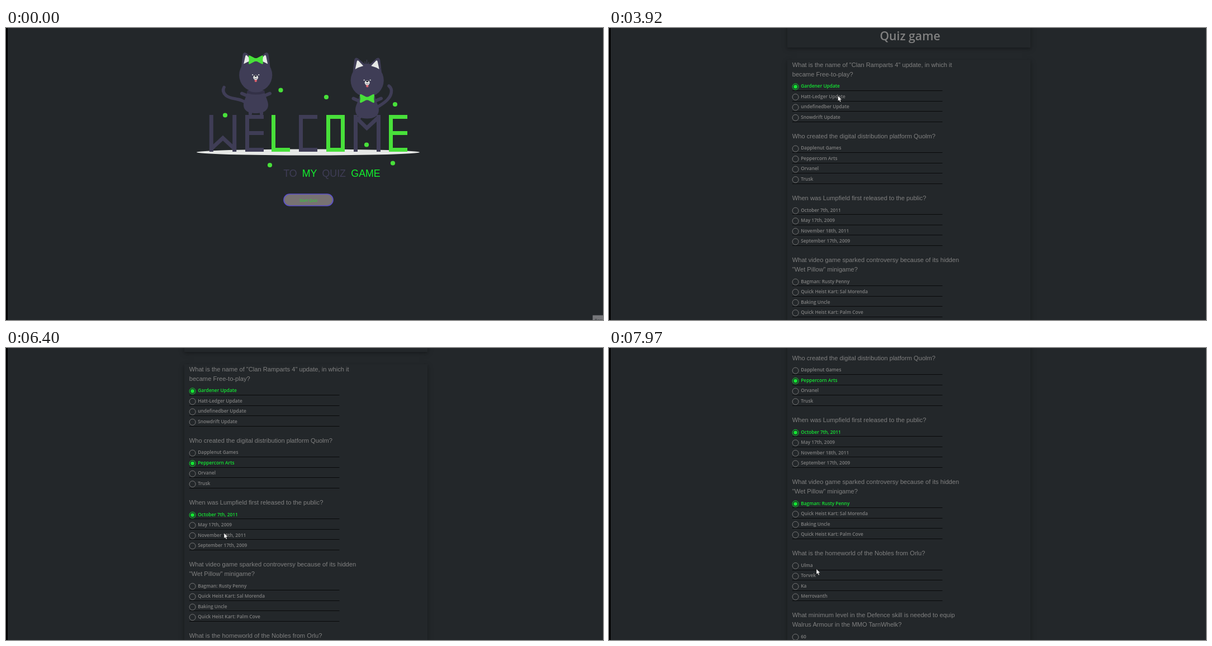
Recreate the animation shown at these times as an HTML page. Size 1068 px wide and 524 px high, loop 8000 ms.

```html
<!DOCTYPE html>
<html lang="en">
<head>
<meta charset="utf-8">
<title>Quiz game</title>
<style>
  html, body { margin: 0; width: 100%; height: 100%; overflow: hidden; background: #23272a; }
  #stage { position: relative; width: 1068px; height: 524px; overflow: hidden; background: #23272a; }
  #stage svg { position: absolute; left: 0; top: 0; overflow: visible; }
  #edge { position: absolute; left: 0; top: 0; width: 3px; height: 524px; background: #000; }
  .view { position: absolute; left: 0; top: 0; width: 1068px; height: 524px; }
  .card {
    position: absolute; background: #23272a;
    box-shadow: 0 2.2px 4.4px rgba(0,0,0,.2), 0 3.3px 11px rgba(0,0,0,.19);
  }
  text { white-space: pre; }
  .title { font: 600 21.2px "Open Sans", "Noto Sans", sans-serif; fill: #808080; text-anchor: middle; }
  .button { font: 6.8px "Open Sans", "Noto Sans", sans-serif; text-anchor: middle; }
  .question { font: 11.15px "Liberation Sans", Arial, sans-serif; fill: #808080; }
  .option text { font: 600 8.35px "Open Sans", "Noto Sans", sans-serif; fill: #808080; }
  .option circle { fill: none; stroke: #808080; stroke-width: .9; }
  .option .dot { display: none; stroke: none; fill: #13e733; }
  .option path { stroke: #08090a; }
  .option.on text { fill: #13e733; }
  .option.on circle { stroke: #13e733; }
  .option.on .dot { display: inline; stroke: none; }
  .tagline { font: 17.8px "Liberation Sans", Arial, sans-serif; }
  .dark { fill: #3f3d56; }
  .lime { fill: #48e03a; }
  .line { fill: none; stroke: #3f3d56; }
  .letters path { fill: none; stroke-width: 7; stroke-linejoin: miter; }
</style>
</head>
<body>
<div id="stage">
  <div id="welcome" class="view">
    <svg width="1068" height="524">
      <defs>
        <filter id="blur" x="-20%" y="-50%" width="140%" height="200%"><feGaussianBlur stdDeviation="2"/></filter>
        <g id="bow">
          <path class="lime" d="M0 -2 L-10.5 -7.6 Q-13 -8.5 -13 -6 Q-11.6 0 -13 6 Q-13 8.5 -10.5 7.4 L0 2 L10.5 7.4 Q13 8.5 13 6 Q11.6 0 13 -6 Q13 -8.5 10.5 -7.6Z"/>
          <circle class="lime" r="3"/>
        </g>
        <g id="head">
          <path class="dark" d="M-26 -12 L-23 -37 Q-21 -43 -16 -39 L-3 -28 H4 L16 -39 Q21 -43 23 -37 L26 -12Z"/>
          <ellipse class="dark" rx="29.6" ry="30"/>
          <path fill="#e6e8e6" d="M-21.5 -20 L-18.5 -34 Q-17.5 -37 -15 -34.5 L-7 -26 Q-15 -24 -21.5 -20Z M21.5 -20 L18.5 -34 Q17.5 -37 15 -34.5 L7 -26 Q15 -24 21.5 -20Z"/>
          <circle cx="-5.5" cy="-.5" r="1.1" fill="#e6e8e6"/>
          <circle cx="5.5" cy="-.5" r="1.1" fill="#e6e8e6"/>
          <path d="M-2 7 H2.2 V10.5 Q2.2 12.5 .1 12.5 Q-2 12.5 -2 10.5Z" fill="#d9626d"/>
          <ellipse cy="4.2" rx="4.4" ry="4.2" fill="#e6e8e6"/>
          <ellipse cy="1.8" rx="2.2" ry="1.4" fill="#23232f"/>
          <path d="M-2.5 5.4 Q0 7.4 2.5 5.4" fill="none" stroke="#3f3d56" stroke-width=".8"/>
        </g>
      </defs>
      <ellipse cx="540.5" cy="223" rx="199.5" ry="5.5" fill="#e6e8e6"/>

      <g>
        <path class="line" stroke-width="5.5" stroke-linecap="round" d="M430 135 C420 125 402 129 393.5 121 C387 115 388 110 390 106.5"/>
        <path class="line" stroke-width="6" stroke-linecap="round" d="M435 123 L422 117.5 M459 123 L472 117.5 M437 146 V154 M457 146 V154"/>
        <path class="dark" d="M432 112 H462 C463 122 469 130 469 138 C469 149 459 153 447 153 C435 153 425 149 425 138 C425 130 431 122 432 112Z"/>
        <path d="M432 112 Q447 119 462 112 L463 117 Q447 122 431 117Z" fill="#333147"/>
        <use href="#head" x="446.7" y="84.5"/>
        <use href="#bow" x="447" y="57"/>
      </g>
      <g>
        <path class="line" stroke-width="5.5" stroke-linecap="round" d="M664 142 C678 134 690 125 689.5 112 Q689 107 685 104"/>
        <path class="line" stroke-width="6" stroke-linecap="round" d="M634 132 L621.5 126.5 M658 132 L671 126.5 M636 156 L631 162"/>
        <path class="dark" d="M632 122 H660 C661 132 667 138 667 147 C667 158 658 162.5 646 162.5 C634 162.5 625 158 625 147 C625 138 631 132 632 122Z"/>
        <path class="line" stroke-width="1.2" d="M643 66 L642 60 M645.5 66 V57 M648 66 L649 61"/>
        <use href="#head" x="646.2" y="94"/>
        <use href="#bow" x="646" y="126.5"/>
      </g>

      <g class="letters" stroke="#3f3d56">
        <path d="M367.3 156V222 M408.7 156V222 M367.5 216.5L388 197.5L408.5 216.5"/>
        <path d="M461 159.5H431.5V218.5H461 M431.5 188.5H461"/>
        <path d="M557 159.5H527.5V218.5H557"/>
        <path d="M625.5 156V222 M666.5 156V222 M625.5 160L645.5 179.5L666.5 160"/>
      </g>
      <g class="letters" stroke="#48e03a">
        <path d="M478.5 156V218.5H508"/>
        <path d="M576.5 159.5H602.5V218.5H576.5Z"/>
        <path d="M718 159.5H688.5V218.5H718 M688.5 188.5H718"/>
      </g>
      <g id="dots"></g>

      <g class="tagline">
        <text class="dark" x="496.3" y="267">TO</text>
        <text x="529.8" y="267" fill="#12f02d">MY</text>
        <text class="dark" x="565.5" y="267">QUIZ</text>
        <text x="617.3" y="267" fill="#12f02d">GAME</text>
      </g>
      <rect id="hover" x="495" y="296.5" width="92" height="24" rx="12" fill="#5b50c8" filter="url(#blur)"/>
      <rect x="497" y="298" width="88" height="21" rx="10.5" fill="#787273" stroke="#5b50c8" stroke-width="1.7"/>
      <text class="button" x="541" y="311.5" fill="#22e02c" style="font-size:7px">Start Quiz</text>
      <g id="tip">
        <rect x="1049.5" y="515.5" width="30" height="20" fill="#76777a"/>
        <text x="1053" y="526.5" font-size="8" font-family="Open Sans, sans-serif" fill="#23272a">Reset</text>
      </g>
    </svg>
  </div>

  <div id="loading" class="view">
    <div class="card" style="left:484px;top:-30px;width:114px;height:65px"></div>
    <div class="card" style="left:484px;top:57px;width:114px;height:23px"></div>
    <svg width="1068" height="524">
      <text class="title" x="543" y="22">Quiz game</text>
      <rect x="608.3" y="58" width="89" height="21.6" rx="10.8" fill="none" stroke="#808080" stroke-width=".9"/>
      <text class="button" x="652.7" y="71.5" fill="#808080">Submit Answers</text>
    </svg>
  </div>

  <div id="quiz" class="view">
    <div class="card" style="left:319px;top:-30px;width:435px;height:65px"></div>
    <div class="card" style="left:319px;top:57px;width:435px;height:1400px"></div>
    <svg width="1068" height="524">
      <text class="title" x="538.5" y="22">Quiz game</text>
      <g id="list"></g>
    </svg>
  </div>

  <svg width="1068" height="524">
    <path id="cursor" d="M0 0V9.6L2.2 7.7L3.8 11.2L5.4 10.4L3.9 7.1H6.9Z" fill="#fff" stroke="#111" stroke-width=".5"/>
  </svg>
  <div id="edge"></div>
</div>

<script>
const LOOP = 8000;
const $ = id => document.getElementById(id);

const questions = [
  [['What is the name of "Clan Ramparts 4" update, in which it', 'became Free-to-play?'],
    ['Gardener Update', 'Hatt-Ledger Update', 'undefinedber Update', 'Snowdrift Update']],
  [['Who created the digital distribution platform Quolm?'],
    ['Dapplenut Games', 'Peppercorn Arts', 'Orvanel', 'Trusk']],
  [['When was Lumpfield first released to the public?'],
    ['October 7th, 2011', 'May 17th, 2009', 'November 18th, 2011', 'September 17th, 2009']],
  [['What video game sparked controversy because of its hidden', '"Wet Pillow" minigame?'],
    ['Bagman: Rusty Penny', 'Quick Heist Kart: Sal Morenda', 'Baking Uncle', 'Quick Heist Kart: Palm Cove']],
  [['What is the homeworld of the Nobles from Orlu?'],
    ['Ulma', 'Torvek', 'Ka', 'Merrovanth']],
  [['What minimum level in the Defence skill is needed to equip', 'Walrus Armour in the MMO TarnWhelk?'],
    ['60', '50', '70', '40']]
];

// question, option, time of the click
const picks = [[0, 0, 3430], [1, 1, 4790], [2, 0, 5660], [3, 0, 7430]];

// start, end and number of redraws of each burst of movement
const bursts = [
  [70, 820, 11], [890, 1240, 6], [1380, 1510, 3], [1770, 1980, 4], [2180, 2900, 11],
  [3030, 3100, 2], [3430, 4180, 12], [4240, 4380, 3], [4640, 4640, 1], [4790, 4790, 1],
  [4990, 5330, 6], [5660, 5800, 3], [6330, 7080, 11], [7150, 7900, 12], [7970, 7970, 1]
];

// time, x, y
const path = [
  [70, 1062, 516], [350, 800, 425], [600, 650, 365], [820, 595, 343], [1240, 562, 316],
  [2110, 562, 316], [2500, 500, 225], [2900, 416, 106], [3030, 417, 106], [3430, 418, 106],
  [3700, 415, 107], [3907, 409.5, 121.5], [4050, 437, 170], [4180, 429, 212], [4380, 382, 225],
  [4570, 382, 225], [4640, 386, 226], [4790, 386, 231], [4920, 386, 231], [5130, 403, 285],
  [5330, 390, 332], [6700, 390, 332], [7220, 371, 396.5]
];

// time, offset
const scroll = [[6260, 0], [6405, 28], [6480, 46], [6555, 58], [6630, 63], [7700, 63], [7970, 176]];

function buildList() {
  let y = 70, html = '';
  for (const [lines, answers] of questions) {
    lines.forEach((line, i) => {
      if (i) y += 16.7;
      html += `<text class="question" x="327.7" y="${y}">${line}</text>`;
    });
    answers.forEach((answer, i) => {
      const mid = y + 17.7 + i * 18.52;
      html += `<g class="option"><circle cx="333.6" cy="${mid + 1}" r="5.5"/>` +
        `<circle class="dot" cx="333.6" cy="${mid + 1}" r="3.3"/>` +
        `<text x="343.2" y="${mid + 2.8}">${answer}</text>` +
        `<path d="M328 ${Math.round(mid + 7.6) + .5}H596.5"/></g>`;
    });
    y += 111.2;
  }
  $('list').innerHTML = html;
  const nodes = [...document.querySelectorAll('.option')];
  return picks.map(([q, o, time]) => [nodes[q * 4 + o], time]);
}

function buildDots() {
  const spots = [[491.5, 111.5], [573, 124], [696, 137], [392, 156.5], [645, 209.5], [692, 242.5], [472, 246]];
  $('dots').innerHTML = spots.map(([x, y]) => `<circle class="lime" cx="${x}" cy="${y}" r="4.1"/>`).join('');
}

// Holds the picture still between redraws.
function snap(t) {
  const burst = bursts.filter(b => b[0] <= t).pop();
  if (!burst) return 0;
  const [start, end, n] = burst;
  if (t >= end) return end;
  const gap = (end - start) / (n - 1);
  return start + Math.floor((t - start) / gap + .15) * gap;
}

function sample(keys, t) {
  const i = keys.findIndex(k => k[0] > t);
  if (i === 0) return keys[0].slice(1);
  if (i < 0) return keys[keys.length - 1].slice(1);
  const a = keys[i - 1], b = keys[i], f = (t - a[0]) / (b[0] - a[0]);
  return a.slice(1).map((v, j) => v + (b[j + 1] - v) * f);
}

const show = (id, on) => { $(id).style.display = on ? '' : 'none'; };

buildDots();
const checks = buildList();
const begin = performance.now();

function draw() {
  const t = snap((performance.now() - begin) % LOOP);
  show('welcome', t < 1380);
  show('loading', t >= 1380 && t < 1770);
  show('quiz', t >= 1770);
  show('tip', t < 70);
  show('hover', t >= 1100);
  show('cursor', t >= 70);
  const [x, y] = sample(path, t);
  $('cursor').setAttribute('transform', `translate(${x} ${y})`);
  $('quiz').style.transform = `translateY(${-Math.round(sample(scroll, t)[0])}px)`;
  for (const [node, time] of checks) node.classList.toggle('on', t >= time);
  requestAnimationFrame(draw);
}
draw();
</script>
</body>
</html>
```
